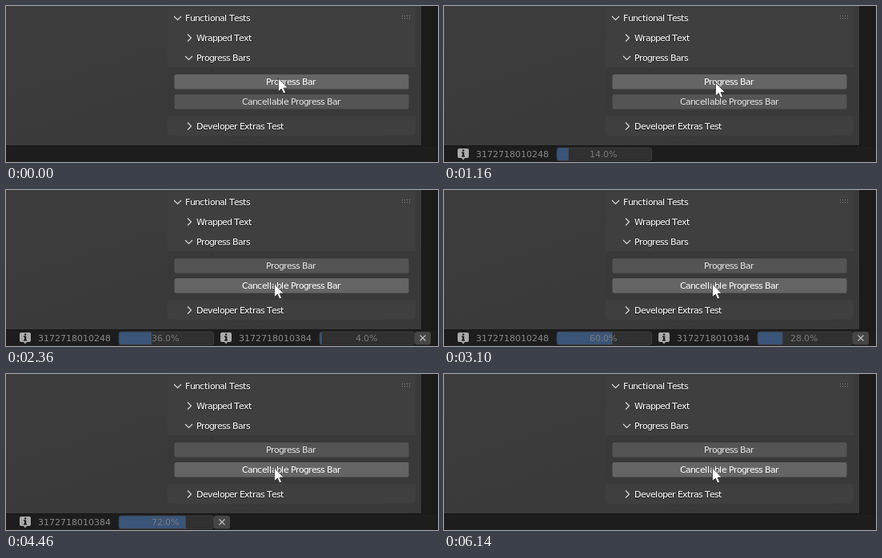
An HTML page for the animation above (6240 ms loop, 540 by 196 pixels).

```html
<!DOCTYPE html>
<html lang="en">
<head>
<meta charset="utf-8">
<title>Progress bars</title>
<style>
  html, body { margin: 0; width: 100%; height: 100%; overflow: hidden; background: #1d1d1d; }
  svg { display: block; width: 540px; height: 196px; }
  text { font: 11px "DejaVu Sans", sans-serif; fill: #fff; }
  .title { text-shadow: 0 1px 1px rgba(0, 0, 0, .5); }
  .chevron { fill: none; stroke: #d8d8d8; stroke-width: 1.2; }
  .button rect { fill: #545454; }
  .button text { fill: #e4e4e4; }
  .button.hover rect { fill: #656565; }
  .button.press rect { fill: #4772b3; }
  .button.hover text, .button.press text { fill: #fff; }
  .job text { fill: #8a8a8a; }
  .job .value { fill: #7a7a7a; }
  .job .track { fill: #303030; }
  .job .fill { fill: #3b5578; }
  .job .edge { fill: none; stroke: #3b3b3b; }
</style>
</head>
<body>
<svg viewBox="0 0 540 196">
  <defs>
    <linearGradient id="view" x1="0" y1="0" x2="1" y2="1">
      <stop offset="0" stop-color="#3d3d3d"/>
      <stop offset="1" stop-color="#383838"/>
    </linearGradient>
    <path id="right" class="chevron" d="M-2-4.500 2.500 0-2 4.500"/>
    <path id="down" class="chevron" d="M-4.500-2 0 2.500 4.500-2"/>
    <g id="info">
      <path fill="#aaa" d="M19 179h10q2 0 2 2v8q0 2-2 2h-3l-2 2.500-2-2.500h-3q-2 0-2-2v-8q0-2 2-2z"/>
      <path fill="#1d1d1d" d="M23 180.500h2.200v2H23zM22 183.600h3.200v4.400H26v1.400h-4V188h1v-3h-1z"/>
    </g>
    <clipPath id="bar"><rect x="141" y="178" width="119" height="16.500" rx="3"/></clipPath>
  </defs>

  <rect width="519" height="176" fill="url(#view)"/>
  <rect x="519" width="21" height="176" fill="#1b1b1b"/>
  <rect y="175" width="540" height="1.500" fill="#181818"/>
  <rect y="176.500" width="540" height="20" fill="#1d1d1d"/>

  <rect x="202" y="2" width="310" height="161" rx="4" fill="#3f3f3f"/>
  <rect x="202" y="77" width="310" height="61" fill="#393939"/>
  <g id="dots" fill="#858585"></g>

  <use href="#down" x="214.500" y="15"/>
  <use href="#right" x="229" y="40"/>
  <use href="#down" x="228.500" y="65"/>
  <use href="#right" x="229" y="151"/>
  <g class="title">
    <text x="224" y="19">Functional Tests</text>
    <text x="238" y="44">Wrapped Text</text>
    <text x="238" y="69">Progress Bars</text>
    <text x="238" y="155">Developer Extras Test</text>
  </g>

  <g class="button" id="plain">
    <rect x="210.500" y="86" width="293" height="18.500" rx="2.500"/>
    <text data-mid="356.500" y="99">Progress Bar</text>
  </g>
  <g class="button" id="cancellable">
    <rect x="210.500" y="111" width="293" height="18.500" rx="2.500"/>
    <text data-mid="356.500" y="124">Cancellable Progress Bar</text>
  </g>

  <g class="job" id="first">
    <use href="#info"/>
    <text x="40" y="190">3172718010248</text>
    <g clip-path="url(#bar)">
      <rect class="track" x="141" y="178" width="119" height="17"/>
      <rect class="fill" x="141" y="178" height="17"/>
    </g>
    <rect class="edge" x="141" y="178" width="118.500" height="16.500" rx="3"/>
    <text class="value" data-mid="199.500" y="190"></text>
  </g>
  <g class="job" id="second">
    <use href="#info"/>
    <text x="40" y="190">3172718010384</text>
    <g clip-path="url(#bar)">
      <rect class="track" x="141" y="178" width="119" height="17"/>
      <rect class="fill" x="141" y="178" height="17"/>
    </g>
    <rect class="edge" x="141" y="178" width="118.500" height="16.500" rx="3"/>
    <text class="value" data-mid="199.500" y="190"></text>
    <rect x="260" y="178" width="20" height="16.500" rx="3" fill="#464646"/>
    <path d="M266.500 182.500l7 7m0-7l-7 7" stroke="#c4c4c4" stroke-width="1.100"/>
  </g>

  <path id="cursor" fill="#fff" stroke="#222" stroke-width=".7" stroke-linejoin="round"
        d="M0 0V16.500L3.800 13 6.400 18.800 9 17.600 6.500 12H11.800Z"/>
</svg>
<script>
const LOOP = 6240;
const $ = id => document.getElementById(id);

// [time in ms, number of 2% ticks]; both jobs tick faster while they run together
const jobs = [
  { el: $("first"), ticks: [[200, 0], [320, 1], [460, 2], [2140, 16], [2300, 17], [2360, 18], [4220, 50]] },
  { el: $("second"), ticks: [[2180, 0], [2300, 1], [2360, 2], [4220, 34], [4320, 35], [5520, 45], [5660, 46], [6140, 50]] }
];
const buttons = [
  { el: $("plain"), press: [60, 180] },
  { el: $("cancellable"), press: [2020, 2160] }
];

// The interface sets glyphs on whole pixels, cutting off each advance's fraction
const pen = document.createElement("canvas").getContext("2d");
pen.font = '1100px "DejaVu Sans", sans-serif';
const advance = c => Math.floor(pen.measureText(c).width / 100 + .01);

function setGlyphs(el) {
  const widths = [...el.textContent].map(advance);
  const total = widths.reduce((a, b) => a + b, 0);
  const mid = el.dataset.mid;
  let x = mid ? Math.floor(mid - total / 2) : parseFloat(el.getAttribute("x"));
  el.setAttribute("x", widths.map(w => (x += w) - w).join(" "));
}

for (let i = 0; i < 8; i++) {
  const dot = document.createElementNS("http://www.w3.org/2000/svg", "rect");
  const attrs = { x: 495 + (i % 4) * 3, y: 12 + (i >> 2) * 3, width: 1, height: 1 };
  for (const k in attrs) dot.setAttribute(k, attrs[k]);
  $("dots").append(dot);
}

function ticksAt(points, t) {
  const i = points.findIndex(p => p[0] > t);
  if (i < 1) return -1;
  const [t0, n0] = points[i - 1], [t1, n1] = points[i];
  return Math.floor(n0 + (n1 - n0) * (t - t0) / (t1 - t0) + 1e-6);
}

function drawJob({ el, ticks }, t, slot) {
  const n = ticksAt(ticks, t);
  el.style.display = n < 0 ? "none" : "";
  if (n < 0) return false;
  const percent = n * 2;
  const value = el.querySelector(".value");
  el.setAttribute("transform", `translate(${slot * 251} 0)`);
  el.querySelector(".fill").setAttribute("width", Math.max(0, percent * 1.19 - 2));
  value.textContent = percent.toFixed(1) + "%";
  setGlyphs(value);
  return true;
}

function draw(t) {
  const u = Math.min(1, Math.max(0, (t - 1040) / 420));
  const ease = u * u * (3 - 2 * u);
  const y = 91 + 27 * ease;
  $("cursor").setAttribute("transform", `translate(${340.5 - 5 * ease} ${y})`);

  const over = y < 107.5 ? 0 : 1;
  buttons.forEach(({ el, press }, i) => {
    const pressed = t >= press[0] && t < press[1];
    el.setAttribute("class", "button" + (pressed ? " press" : i === over ? " hover" : ""));
  });

  let slot = 0;
  for (const job of jobs) if (drawJob(job, t, slot)) slot++;
}

document.querySelectorAll("text").forEach(setGlyphs);
const start = performance.now();
function frame() {
  draw((performance.now() - start) % LOOP);
  requestAnimationFrame(frame);
}
frame();
</script>
</body>
</html>
```
